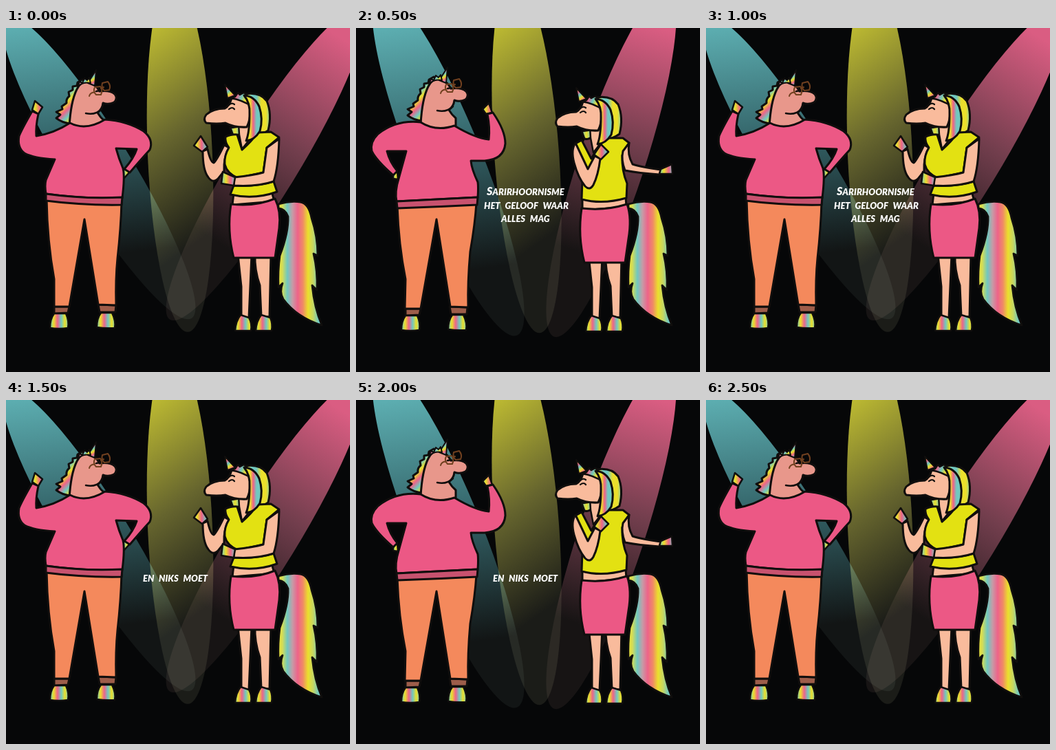
An HTML page with a canvas that plays this animation: 500x500 px, repeating every 3000 ms.

```html
<!DOCTYPE html>
<html lang="nl">
<head>
<meta charset="utf-8">
<style>
  html, body { margin: 0; width: 100%; height: 100%; overflow: hidden; background: #060708; }
  canvas { display: block; width: 500px; height: 500px; }
</style>
</head>
<body>
<canvas id="stage" width="500" height="500"></canvas>
<script>
const ctx = document.getElementById('stage').getContext('2d');

const INK = '#100e0d', PINK = '#ec5885', HEM = '#c8526f', ORANGE = '#f4895c', CUFF = '#9d5d4a';
const MAN_SKIN = '#e8978b', SKIN = '#f9bb9c', YELLOW = '#e3e112', BROWN = '#70401f';
const TEAL_STRIPE = '#70c8c0', YELLOW_STRIPE = '#ebdf2c', PINK_STRIPE = '#ee6389';

function linear(x0, y0, x1, y1, colors) {
  const g = ctx.createLinearGradient(x0, y0, x1, y1);
  colors.forEach((c, i) => g.addColorStop(i / (colors.length - 1), c));
  return g;
}

function rainbow(x0, y0, x1, y1, cycles = 1) {
  const colors = [TEAL_STRIPE];
  for (let i = 0; i < cycles; i++) colors.push(YELLOW_STRIPE, PINK_STRIPE, TEAL_STRIPE);
  return linear(x0, y0, x1, y1, colors);
}

function shape(fill, d, width = 3) {
  const path = new Path2D(d);
  ctx.fillStyle = fill;
  ctx.fill(path);
  line(path, width);
}

function line(d, width = 2.5, color = INK) {
  ctx.lineWidth = width;
  ctx.strokeStyle = color;
  ctx.stroke(new Path2D(d));
}

function shifted(dx, dy, draw) {
  ctx.save();
  ctx.translate(dx, dy);
  draw();
  ctx.restore();
}

// Each beam: centre, half length, half width, lean in radians, gradient ends.
function beam([cx, cy, a, b, lean, ...ends], colors) {
  ctx.globalCompositeOperation = 'lighter';
  ctx.fillStyle = linear(...ends, colors);
  ctx.beginPath();
  ctx.ellipse(cx, cy, b, a, lean, 0, Math.PI * 2);
  ctx.fill();
  ctx.globalCompositeOperation = 'source-over';
}

const BEAM_COLORS = {
  teal: ['#56a6a8', '#2d5b5f', '#0c0e0d'],
  yellow: ['#b8b42a', '#605e26', '#151510'],
  pink: ['#d4567a', '#6c3745', '#110d0c']
};

const POSES = [
  {
    beams: {
      teal: [135, 203, 257, 47, -0.551, 20, 0, 60, 340],
      yellow: [253, 185, 257, 47, -0.044, 180, 20, 350, 260],
      pink: [377, 198, 265, 47, 0.551, 480, 10, 290, 300]
    },
    man: {
      head: [0, 0],
      feet: [0, 0],
      trousers: 'M59 248L168 253Q167 290 162 335Q159 365 160 403L134 402L114 278L92 405L70 405L70 365Q60 310 59 248Z',
      sweater: 'M93 138Q116 150 144 133Q176 135 200 150Q215 162 209 177Q198 189 180 210L172 205Q186 189 190 176L160 175Q164 190 170 204Q173 215 169 247Q115 249 58 241Q56 228 58 221L71 191Q40 189 27 182Q16 174 19 157Q23 147 38 121L47 125Q43 143 44 157Q70 153 93 138Z',
      hem: 'M58 241Q115 249 169 246L168 257Q112 258 58 251Z',
      hands: ['M38 119L42 106L53 115L47 125Z', 'M172 204L180 209L172 218Q168 212 172 204Z']
    },
    woman: {
      head: [0, 0],
      legs: [0, 0],
      belly: 'M331 240L329 257L390 252L386 237Z',
      skirt: 'M327 256Q362 260 391 248Q400 266 397 291L391 334L331 334Q321 295 327 256Z',
      armOverTop: false,
      tops: [
        'M319 158Q329 154 336 155L343 177Q357 165 366 152L385 151L397 159L379 174L374 210L337 218Q321 211 318 198Q317 185 324 174Q318 166 319 158Z',
        'M331 229Q362 231 389 223L394 238Q361 250 326 242Z'
      ],
      arms: [
        'M286 179Q286 207 294 217Q301 227 309 218L317 208Q316 188 324 174L317 170Q307 191 302 196Q297 195 293 176Z',
        'M379 174L397 161Q396 202 389 223Q366 231 331 229L332 217Q360 214 374 210Z'
      ],
      hands: ['M273 171L283 157L293 173L285 180Z', 'M315 209L333 217L331 229L313 226Z']
    }
  },
  {
    beams: {
      teal: [134, 196, 270, 51, -0.379, 60, 0, 110, 360],
      yellow: [248, 183, 261, 47, -0.0735, 170, 20, 340, 260],
      pink: [371, 197, 265, 48, 0.318, 440, 0, 340, 330]
    },
    man: {
      head: [2, -4],
      feet: [2, 3],
      trousers: 'M60 258L175 254Q173 285 166 325Q162 370 163 406L137 405L117 278L94 408L71 408L72 365Q62 315 60 258Z',
      sweater: 'M94 137Q116 151 143 142Q173 160 193 162Q195 145 191 125L199 123Q217 149 217 168Q215 191 187 193L167 193Q168 205 177 224Q178 231 177 246Q119 249 59 252Q56 238 62 219L73 179L45 179Q49 195 60 208L54 214Q29 192 23 179Q20 166 32 154Q59 133 94 137Z',
      hem: 'M59 252Q119 249 177 246L176 257Q119 260 60 262Z',
      hands: ['M184 118L193 109L198 123L189 125Z', 'M54 213L60 207L61 220L54 219Z']
    },
    woman: {
      head: [2, 5],
      legs: [1, 1],
      belly: 'M329 246L329 265L393 260L392 246Z',
      skirt: 'M328 262Q362 266 394 256Q401 276 396 306L391 341L332 341Q322 302 328 262Z',
      armOverTop: true,
      tops: ['M319 168L328 163L342 190L355 168L368 160L388 160L397 167L387 185Q386 207 394 226L393 247Q359 257 328 249L329 220Z'],
      arms: [
        'M319 167Q312 177 317 196Q323 218 333 230Q340 237 345 228Q352 214 355 190L347 186L337 205Z',
        'M397 167Q394 184 402 198Q414 202 443 206L441 213Q411 211 391 207Q385 192 388 179Z'
      ],
      hands: ['M346 184L356 169L367 180L356 191Z', 'M443 205L459 198L460 212L441 212Z']
    }
  }
];

function handShape(d) {
  const left = parseFloat(d.slice(1));
  shape(rainbow(left - 2, 0, left + 18, 0), d, 2.5);
}

function shoe(x, d) {
  shape(linear(x, 0, x + 27, 0,
    [TEAL_STRIPE, YELLOW_STRIPE, PINK_STRIPE, TEAL_STRIPE, YELLOW_STRIPE, TEAL_STRIPE]), d, 2.5);
}

function manHead() {
  shape(rainbow(72, 82, 120, 130, 3),
    'M117 79L111 75L104 79L103 84L97 85L97 90L91 93L92 99Q87 103 88 109L81 114L82 118L73 122L79 126L73 131Q82 138 94 139Q112 112 122 80Z');
  shape(MAN_SKIN,
    'M92 144Q94 107 103 89Q109 76 121 79Q131 82 136 92Q151 90 158 96Q163 103 157 108Q149 112 141 109Q140 118 133 123Q137 130 143 135L143 146L120 158L94 150Z');
  shape(rainbow(118, 62, 130, 82, 2), 'M119 80L131 61L129 84Z', 2);
  shape(rainbow(104, 70, 124, 86, 2), 'M104 85L107 78L111 80L114 73L118 76L121 72L123 80Q112 78 104 85Z', 2);
  line('M116 124Q130 127 139 118');
  line('M129 86L137 85Q141 90 138 97L131 97Q126 92 129 86ZM140 80L148 78Q153 84 150 90L143 91Q138 87 140 80ZM138 88L142 86M129 93Q122 94 121 99', 2, BROWN);
  line('M131 92L136 91', 2.5);
}

function manFeet() {
  shape(CUFF, 'M70 405L92 405L90 414L70 415Z');
  shape(CUFF, 'M134 402L160 403L159 413L136 413Z');
  shoe(64, 'M70 415L87 415Q92 426 90 436Q77 438 64 436Q64 423 70 415Z');
  shoe(132, 'M138 414L154 414Q160 426 158 436Q145 437 132 435Q132 422 138 414Z');
}

function drawMan(pose) {
  shifted(...pose.feet, manFeet);
  shape(ORANGE, pose.trousers);
  shifted(...pose.head, manHead);
  pose.hands.forEach(handShape);
  shape(PINK, pose.sweater);
  shape(HEM, pose.hem);
}

function womanBackHair() {
  shape(linear(326, 0, 340, 0, [TEAL_STRIPE, YELLOW_STRIPE, TEAL_STRIPE]), 'M326 145L340 143L341 152Q337 158 330 156Z');
  shape(linear(350, 0, 385, 0, [YELLOW_STRIPE, TEAL_STRIPE, TEAL_STRIPE, YELLOW_STRIPE, YELLOW_STRIPE, TEAL_STRIPE]),
    'M342 97Q368 91 379 106Q387 125 381 149Q373 155 357 159Z');
  shape(SKIN, 'M338 139L339 155L343 176L358 157L351 136Z', 2.5);
}

function womanHead() {
  shape(SKIN,
    'M328 102Q325 113 318 117Q301 117 291 126Q286 133 291 138Q307 140 319 138Q333 145 350 144Q360 123 349 101Z');
  shape(rainbow(314, 82, 330, 104, 2), 'M318 82L322 102L333 98Z', 2);
  shape(rainbow(322, 94, 360, 112, 2), 'M326 102L333 100L337 94L340 97L346 94L350 98Q358 104 359 115Q343 104 326 102Z', 2.5);
  shape(linear(346, 0, 373, 0, [TEAL_STRIPE, YELLOW_STRIPE, YELLOW_STRIPE, PINK_STRIPE, TEAL_STRIPE, TEAL_STRIPE, YELLOW_STRIPE]),
    'M346 98Q361 99 368 114Q374 132 369 150Q361 163 349 164Q354 152 354 125Q355 109 346 98Z');
  line('M324 112Q328 108 332 111M324 118Q329 114 332 118', 2.2);
}

function womanLegs() {
  shape(SKIN, 'M337 329L342 376L342 420L353 421L357 329Z');
  shape(SKIN, 'M362 329Q361 352 369 374L371 419L383 420L385 329Z');
  shoe(332, 'M341 417L353 421Q358 430 356 440L333 440Q334 426 341 417Z');
  shoe(362, 'M371 417L384 421Q388 430 386 440L363 440Q364 426 371 417Z');
}

function drawTail() {
  const stripes = linear(394, 0, 454, 0,
    [YELLOW_STRIPE, '#d6dd55', TEAL_STRIPE, '#c69aa6', PINK_STRIPE, '#f08a66', YELLOW_STRIPE, '#c5d665', TEAL_STRIPE]);
  shape(stripes,
    'M396 256Q412 251 428 253Q440 255 444 276Q453 303 453 331L447 328Q453 353 452 381L445 374Q448 406 459 432Q422 420 403 394Q397 384 402 371L396 377Q395 353 398 331Q411 297 410 274Q406 263 396 262Z', 2.8);
}

function drawWoman(pose) {
  const frontArm = () => shape(SKIN, pose.arms[0]);
  drawTail();
  shifted(...pose.legs, womanLegs);
  shape(SKIN, pose.belly);
  shape(PINK, pose.skirt);
  shifted(...pose.head, womanBackHair);
  if (!pose.armOverTop) frontArm();
  pose.tops.forEach(d => shape(YELLOW, d));
  if (pose.armOverTop) frontArm();
  shape(SKIN, pose.arms[1]);
  shifted(...pose.head, womanHead);
  pose.hands.forEach(handShape);
}

function caption(text, x, y) {
  const draw = (part, size) => {
    ctx.font = `italic 900 ${size}px Lato, sans-serif`;
    ctx.fillText(part, x, y);
    x += ctx.measureText(part).width;
  };
  ctx.fillStyle = '#fff';
  ctx.wordSpacing = '4px';
  if (text[0] !== text[0].toLowerCase()) {
    draw(text[0], 16);
    text = text.slice(1);
  }
  draw(text.toUpperCase(), 13);
}

const CAPTIONS = [
  [],
  [['Sarirhoornisme', 190, 243], ['het geloof waar', 186, 263], ['alles mag', 211, 282]],
  [['en niks moet', 199, 264]]
];

// Six half-second steps: which pose and which caption.
const STEPS = [[0, 0], [1, 1], [0, 1], [0, 2], [1, 2], [0, 0]];

function render(time) {
  const [poseIndex, captionIndex] = STEPS[Math.floor(time % 3000 / 500)];
  const pose = POSES[poseIndex];
  ctx.fillStyle = '#060708';
  ctx.fillRect(0, 0, 500, 500);
  ctx.lineJoin = ctx.lineCap = 'round';
  for (const name in pose.beams) beam(pose.beams[name], BEAM_COLORS[name]);
  drawMan(pose.man);
  drawWoman(pose.woman);
  CAPTIONS[captionIndex].forEach(args => caption(...args));
}

const start = performance.now();
function tick() {
  render(performance.now() - start);
  requestAnimationFrame(tick);
}
tick();
</script>
</body>
</html>
```
